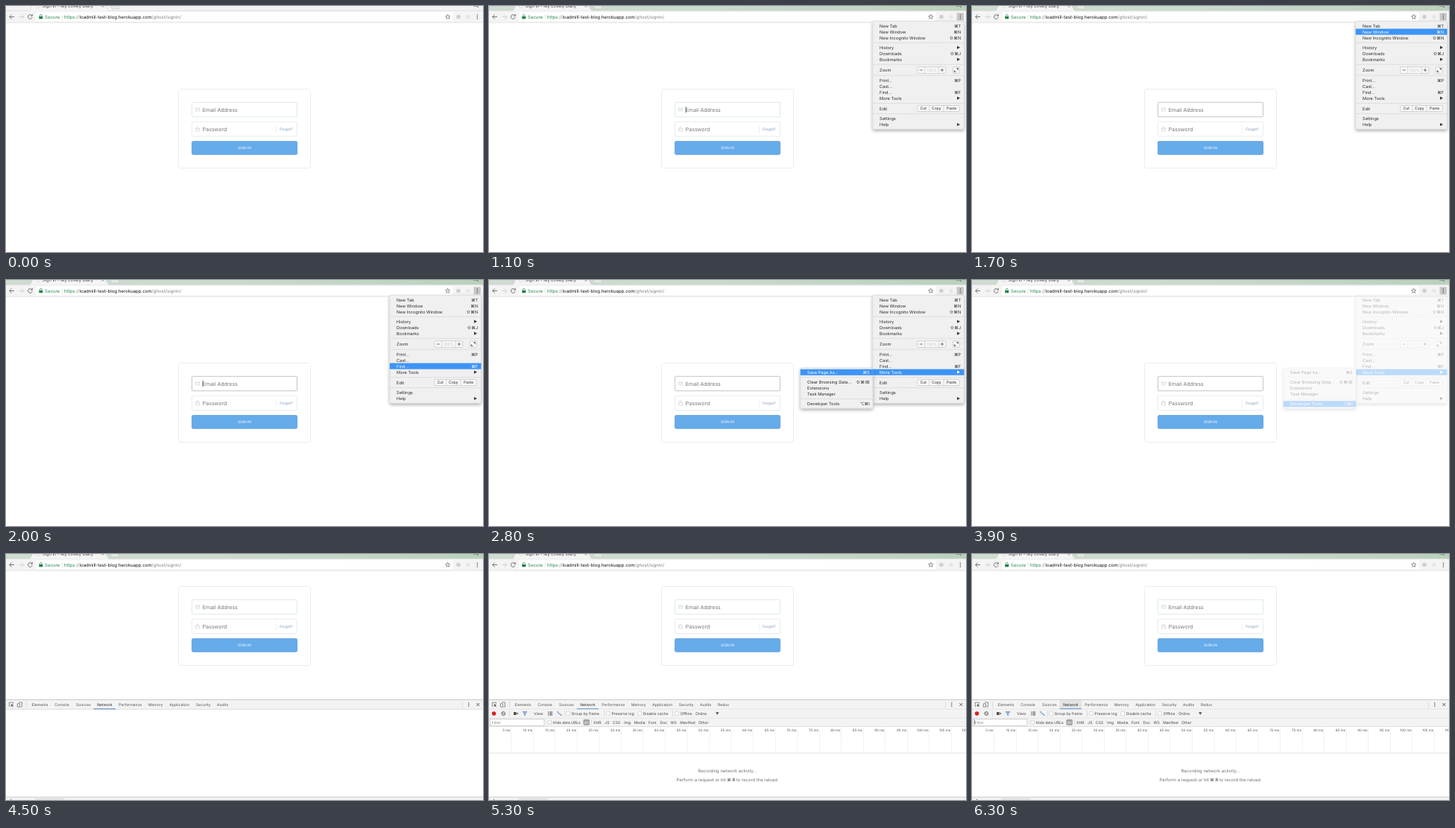
Recreate the animation shown at these times as an HTML page. Size 640 by 330 pixels, loop 6500 ms.

```html
<!DOCTYPE html>
<html lang="en">
<head>
<meta charset="utf-8">
<title>Opening the network panel</title>
<style>
html, body { margin: 0; width: 100%; height: 100%; overflow: hidden; background: #fff; }
svg { display: block; width: 100vw; height: 100vh; }
text { font-family: Inter, "DejaVu Sans", sans-serif; text-rendering: geometricPrecision; white-space: pre; }
.row rect { fill: none; }
.row.on rect { fill: #3d94f6; }
.row.on text, .row.on path { fill: #fff; }
</style>
</head>
<body>
<svg id="stage" viewBox="0 0 640 330" xmlns="http://www.w3.org/2000/svg">
  <defs>
    <linearGradient id="strip">
      <stop offset="0" stop-color="#d0dcd1"/><stop offset=".5" stop-color="#c9dacb"/><stop offset="1" stop-color="#b9d1bc"/>
    </linearGradient>
    <filter id="shade" x="-10%" y="-10%" width="120%" height="125%">
      <feDropShadow dx="0" dy="2" stdDeviation="2" flood-color="#000" flood-opacity=".32"/>
    </filter>
  </defs>
</svg>
<script>
const LOOP = 6500, STEP = 100;
const stage = document.getElementById('stage');

function add(parent, tag, attrs, body) {
  const el = document.createElementNS('http://www.w3.org/2000/svg', tag);
  for (const k in attrs) el.setAttribute(k, attrs[k]);
  if (body) el.innerHTML = body;
  parent.appendChild(el);
  return el;
}
const group = (p, attrs = {}) => add(p, 'g', attrs);
const rect = (p, x, y, width, height, fill, more) =>
  add(p, 'rect', { x, y, width, height, fill, ...more });
const frame = (p, x, y, w, h, stroke, fill = '#fff', rx = 0, sw = .7) =>
  rect(p, x, y, w, h, fill, { stroke, rx, 'stroke-width': sw });
const path = (p, d, stroke, sw = .8, fill = 'none') =>
  add(p, 'path', { d, stroke, 'stroke-width': sw, fill });
const dot = (p, cx, cy, r, fill) => add(p, 'circle', { cx, cy, r, fill });
const ring = (p, cx, cy, r, stroke, sw = .8) =>
  add(p, 'circle', { cx, cy, r, fill: 'none', stroke, 'stroke-width': sw });
// y is the middle of the capitals
const text = (p, s, x, y, size, fill = '#333', more = {}) =>
  add(p, 'text', { x, y: y + size * .36, 'font-size': size, fill, ...more }, s);
const dots = (p, x, y, gap, fill) => [-gap, 0, gap].forEach(d => dot(p, x, y + d, .75, fill));
const show = (el, on) => el.setAttribute('visibility', on ? 'visible' : 'hidden');

// ---- page ----
rect(stage, 0, 0, 640, 330, '#fff');
const form = group(stage);
frame(form, 231.5, 111.5, 177, 106, '#e1e7ea', '#fff', 3);
const email = frame(form, 249.5, 129.3, 141, 19.4, '#d3e2e8', '#fff', 1);
frame(form, 249.5, 155.3, 141, 19.4, '#dde5ea', '#fff', 1);
text(form, 'Email Address', 263.8, 139, 7, '#757575');
text(form, 'Password', 263.8, 165.2, 7, '#757575');
path(form, 'M254.3 137h5.2v4h-5.2zl2.6 2.3 2.6-2.3', '#c8ccd0', .6);
path(form, 'M254.3 164.6h5.2v3.2h-5.2zM255.4 164.6v-1a1.5 1.5 0 0 1 3 0v1', '#c0c4c8', .6);
path(form, 'M362.5 160v10.5', '#e2e6e9', .6);
text(form, 'Forgot?', 367.3, 165, 4.9, '#7695b4');
frame(form, 249.4, 181.5, 141.3, 17.8, '#5798d6', '#66abea', 1.8);
text(form, 'SIGN IN', 320, 190.6, 4.85, '#fff', { 'text-anchor': 'middle' });
const caret = rect(form, 263.7, 134.8, .7, 8.4, '#333');

// ---- browser frame ----
const chrome = group(stage);
const strip = rect(chrome, 0, 0, 640, 7, '#f3f3f3');
path(chrome, 'M139.5 -1l2.3 4.2q.4.8 1.4.8h8q1 0 .6-.9l-1.6-4.1', '#c2c8c3', .6, '#e3e8e4');
rect(chrome, 0, 6.3, 640, 15.7, '#f4f4f4');
path(chrome, 'M0 6.3H30q2 0 2.8-1.8L35.500-1H134l2.500 5.500q.8 1.800 2.800 1.800H640', '#c9cfca', .5);
path(chrome, 'M31 6.600q2-.2 2.800-2L36-1h97.500l2.500 5.600q.8 1.800 2.600 2z', 'none', 0, '#f4f4f4');
path(chrome, 'M41-1h4v3.500h-4z', '#cfcfcf', .5);
text(chrome, 'Sign In - My Lovely Diary', 48.800, -.1, 5.750, '#444');
path(chrome, 'M128.600-1.500l3 3.200m0-3.200l-3 3.200', '#777', .7);
path(chrome, 'M627 0h5.500M632 .5l2 1.500', '#526057', .9);
rect(chrome, 40.500, 8.300, 559, 12.200, '#fff', { rx: 1.500 });
path(chrome, 'M0 22.200H640', '#d9d9d9', .7);
path(chrome, 'M11 14.500H4.800M7.700 11.500l-3 3 3 3', '#666', .9);
path(chrome, 'M17.500 14.500h6.200M20.800 11.500l3 3-3 3', '#cfcfcf', .9);
path(chrome, 'M34.600 12.600a2.900 2.900 0 1 0 .6 2.600M35.300 11v2.300H33', '#666', .9);
path(chrome, 'M44.300 14h5v3.300h-5z', 'none', 0, '#1d8048');
path(chrome, 'M45.400 14v-1.100a1.400 1.400 0 0 1 2.800 0V14', '#1d8048', .7);
text(chrome, 'Secure', 52, 14.500, 6.060, '#26854f');
path(chrome, 'M75.200 11v7', '#d4d4d4', .6);
text(chrome, '<tspan fill="#26854f">https</tspan>://<tspan fill="#111">loadmill-test-blog.herokuapp.com</tspan>/ghost/signin/',
  78, 14.500, 6.060, '#808080');

function star(cx, cy, r) {
  const pts = [...Array(10)].map((_, i) => {
    const a = i * Math.PI / 5, q = i % 2 ? r * .45 : r;
    return (cx + q * Math.sin(a)).toFixed(2) + ' ' + (cy - q * Math.cos(a)).toFixed(2);
  });
  path(chrome, 'M' + pts.join('L') + 'z', '#666', .7);
}
star(592.700, 14.600, 3.300);
dot(chrome, 607, 14.500, 2.800, '#cfcfcf');
dot(chrome, 620, 14.500, 2.600, '#e6e6e6');
const press = rect(chrome, 627.500, 9.300, 9.500, 10.300, '#c9c9c9', { rx: 1 });
dots(chrome, 632.400, 14.500, 2.400, '#555');

// ---- menus ----
const menus = group(stage);
const MENU = 5.650;
const arrow = (p, x, y) => path(p, `M${x} ${y - 2.100}l4 2.100-4 2.100z`, 'none', 0, '#333');

function makeMenu(box, rules, items) {
  const [x, y, w, h] = box, g = group(menus), rows = {};
  frame(g, x, y, w, h, '#cbcbcb', '#f0f0f0', 2, .5).setAttribute('filter', 'url(#shade)');
  rules.forEach(v => rect(g, x, v, w, .8, '#dadada'));
  for (const [label, cy, key] of items) {
    const row = rows[label] = group(g, { class: 'row' });
    rect(row, x, cy - 4, w, 8.100);
    text(row, label, x + 9.300, cy, MENU, '#2b2b2b');
    if (key === '>') arrow(row, x + w - 9.500, cy);
    else if (key) text(row, key, x + w - 4.300, cy, MENU, '#2b2b2b', { 'text-anchor': 'end' });
  }
  return { g, rows };
}

const main = makeMenu([514.800, 20.300, 122.700, 145], [48.700, 77.800, 92.700, 130, 144.200], [
  ['New Tab', 26.500, '⌘T'], ['New Window', 34.500, '⌘N'], ['New Incognito Window', 42.500, '⇧⌘N'],
  ['History', 55.700, '>'], ['Downloads', 63.700, '⇧⌘J'], ['Bookmarks', 71.700, '>'],
  ['Zoom', 86], ['Print...', 99.500, '⌘P'], ['Cast...', 107.500], ['Find...', 115.500, '⌘F'],
  ['More Tools', 123.600, '>'], ['Edit', 137.600], ['Settings', 151], ['Help', 159, '>']
]);
const mid = { 'text-anchor': 'middle' };
frame(main.g, 574.800, 81.700, 38, 8.700, '#bdbdbd', '#f8f8f8', 1, .6);
path(main.g, 'M584.700 81.700v8.700M603.200 81.700v8.700', '#bdbdbd', .6);
path(main.g, 'M577.700 86h4.200M605.800 86h4.400M608 83.800v4.400', '#444', .7);
text(main.g, '100%', 594, 86, 5, '#c4c4c4', mid);
frame(main.g, 622.300, 81.700, 9, 8.700, '#bdbdbd', '#f8f8f8', 1, .6);
path(main.g, 'M627.300 83.500h2.200v2.200zM626.300 88.600h-2.200v-2.200z', '#444', .4, '#444');
frame(main.g, 574.800, 133.400, 56.500, 8.200, '#bdbdbd', '#f8f8f8', 1, .6);
path(main.g, 'M590.700 133.400v8.200M610 133.400v8.200', '#bdbdbd', .6);
[['Cut', 582.800], ['Copy', 600.300], ['Paste', 620.600]].forEach(([s, x]) =>
  text(main.g, s, x, 137.600, 5.100, '#2b2b2b', mid));

const sub = makeMenu([417.800, 118, 97.200, 54.200], [129.800, 159], [
  ['Save Page As...', 123.700, '⌘S'], ['Clear Browsing Data...', 136.700, '⇧⌘⌫'],
  ['Extensions', 144.700], ['Task Manager', 152.800], ['Developer Tools', 166.200, '⌥⌘I']
]);

// ---- developer tools ----
const tools = group(stage), BAR = '#f3f3f3', EDGE = '#cdcdcd', UI = 5.070;
rect(tools, 0, 195.500, 640, 135, '#fff');
const sep = (p, x, y, h = 8) => rect(p, x, y, .6, h, EDGE);
const tabBar = group(tools);
rect(tabBar, 0, 195.500, 640, 12.700, BAR);
rect(tabBar, 0, 195.200, 640, .8, '#bdbdbd');
rect(tabBar, 0, 207.800, 640, .7, EDGE);
rect(tabBar, 0, 326, 640, 4, BAR);
rect(tabBar, 0, 325.700, 640, .8, '#bdbdbd');
rect(tabBar, 39.500, 326.500, 39, 3.500, '#e4e4e4');
dot(tabBar, 6.500, 329.500, .7, '#777');
const tabs = group(tools);
const hover = rect(tabs, 117.700, 196.200, 29.300, 11.600, '#e3e3e3');
[['Elements', 34.500], ['Console', 65.200], ['Sources', 94], ['Network', 122.300], ['Performance', 151.300],
 ['Memory', 190.800], ['Application', 219.300], ['Security', 254.800], ['Audits', 283]].forEach(([s, x]) =>
  text(tabs, s, x, 202, UI, s === 'Network' ? '#222' : '#555'));
rect(tabs, 117.700, 207.200, 29.300, 1.100, '#5b8fc4');
path(tabs, 'M9.500 201v-1.800H4.300v5H6', '#666', .7);
path(tabs, 'M6.700 201.200l3.500 1.400-1.500.6 1.200 1.600-.7.500-1.200-1.600-1 1.100z', 'none', 0, '#555');
path(tabs, 'M17 199h4.500v6h-2M15.300 200.800h3.200v4.400h-3.200z', '#666', .7);
sep(tabs, 27.500, 198);
sep(tabs, 612, 198);
dots(tabs, 620.800, 202, 2.200, '#555');
path(tabs, 'M631.300 200l4 4m0-4l-4 4', '#555', .9);

const net = group(tools);
text(net, 'Redux', 307, 202, UI, '#555');
rect(net, 0, 208.500, 640, 22.700, BAR);
rect(net, 0, 219.800, 640, .6, '#dcdcdc');
rect(net, 0, 231, 640, .6, EDGE);
dot(net, 6.600, 214, 2.700, '#d8201c');
ring(net, 19.200, 214, 2.400, '#555', .9);
path(net, 'M17.500 212.300l3.400 3.400', '#555', .9);
[27, 101, 154, 246].forEach(x => sep(net, x, 210));
path(net, 'M33 212h3.800v4H33zM37 214l2-1.600v3.200z', 'none', 0, '#555');
path(net, 'M45.300 211.600h5.600l-2.200 2.700v2.400l-1.300-.8v-1.600z', '#4478c0', .6, '#9dbbe4');
text(net, 'View:', 60.300, 214, UI, '#444');
path(net, 'M79 212h1.400m.8 0h4M79 214h1.400m.8 0h4M79 216h1.400m.8 0h4', '#555', 1);
path(net, 'M91 212h2.500m-1 2h3.200m-.7 2h3', '#5681bd', 1.100);

function check(label, x, y) {
  frame(net, x, y - 2.400, 4.800, 4.800, '#b5b5b5', '#fff', .8, .5);
  text(net, label, x + 7, y, UI, '#444');
}
[['Group by frame', 103.500], ['Preserve log', 157.500], ['Disable cache', 199.700], ['Offline', 249.700]]
  .forEach(([s, x]) => check(s, x, 214));
text(net, 'Online', 277, 214, UI, '#444');
path(net, 'M304 212.300h4.600l-2.300 3.400z', 'none', 0, '#555');
frame(net, 1.500, 221.300, 72.500, 8.800, '#b9b9b9', '#fff', 0, .6);
text(net, 'Filter', 3.800, 225.700, UI, '#8a8a8a');
const filterCaret = rect(net, 3.200, 222.500, .6, 6.400, '#222');
check('Hide data URLs', 78.800, 225.700);
rect(net, 126.500, 221.700, 8.500, 8, '#a0a0a0', { rx: 1.800 });
text(net, 'All', 130.800, 225.700, UI, '#fff', mid);
sep(net, 137, 222, 7);
[['XHR', 140], ['JS', 155.300], ['CSS', 166], ['Img', 181.300], ['Media', 194.800], ['Font', 214], ['Doc', 229.500],
 ['WS', 243.500], ['Manifest', 256.200], ['Other', 281]].forEach(([s, x]) => text(net, s, x, 225.700, UI, '#444'));
for (let i = 1; i <= 22; i++) {
  const x = 29.530 * i;
  rect(net, x, 231.500, .5, 35.500, '#e4e4e4');
  text(net, i * 5 + ' ms', x - 1, 236, 4.550, '#555', { 'text-anchor': 'end' });
}
rect(net, 0, 266.700, 640, .7, '#d6d6d6');
text(net, 'Recording network activity…', 320, 290.500, 5.900, '#6e6e6e', mid);
text(net, 'Perform a request or hit <tspan font-weight="700">⌘ R</tspan> to record the reload.', 320, 303, 5.900, '#6e6e6e', mid);

// ---- timing: [time, value] steps ----
const mainPick = [[0, ''], [1700, 'New Window'], [1800, 'Downloads'], [1900, 'Print...'], [2000, 'Find...'], [2100, 'More Tools']];
const subPick = [[0, ''], [2800, 'Save Page As...'], [2900, 'Clear Browsing Data...'], [3000, 'Extensions'],
  [3200, 'Task Manager'], [3300, 'Developer Tools'], [3500, ''], [3600, 'Developer Tools']];
const pressed = [[0, 0], [500, .3], [600, .45], [700, .55], [800, .6], [1000, 1], [4200, .5], [4300, 0]];
const fade = [[0, 0], [1000, .6], [1100, 1], [3700, .8], [3800, .57], [3900, .34], [4000, .13], [4100, 0]];

const at = (steps, t) => steps.reduce((v, s) => s[0] <= t ? s[1] : v, steps[0][1]);
const pick = (menu, label) => {
  for (const k in menu.rows) menu.rows[k].classList.toggle('on', k === label);
};

function draw(now) {
  const t = Math.floor(now % LOOP / STEP) * STEP;
  const focus = t >= 1000 && t < 4200;
  strip.setAttribute('fill', t >= 1000 ? 'url(#strip)' : '#f3f3f3');
  press.setAttribute('opacity', at(pressed, t));
  email.setAttribute('stroke', t >= 1200 && focus ? '#a9acae' : '#cfe1e6');
  show(caret, focus && t % 1000 < 500);
  menus.setAttribute('opacity', at(fade, t));
  show(sub.g, t >= 2100);
  pick(main, at(mainPick, t));
  pick(sub, at(subPick, t));
  form.setAttribute('transform', `translate(0 ${t >= 4300 ? -68 : 0})`);
  show(tools, t >= 4200);
  show(tabBar, t >= 4300);
  show(tabs, t >= 4400);
  show(hover, t >= 5700);
  show(net, t >= 4700);
  show(filterCaret, t >= 6300);
}

let start;
function tick(now) {
  start ??= now;
  draw(now - start);
  requestAnimationFrame(tick);
}
draw(0);
requestAnimationFrame(tick);
</script>
</body>
</html>
```
